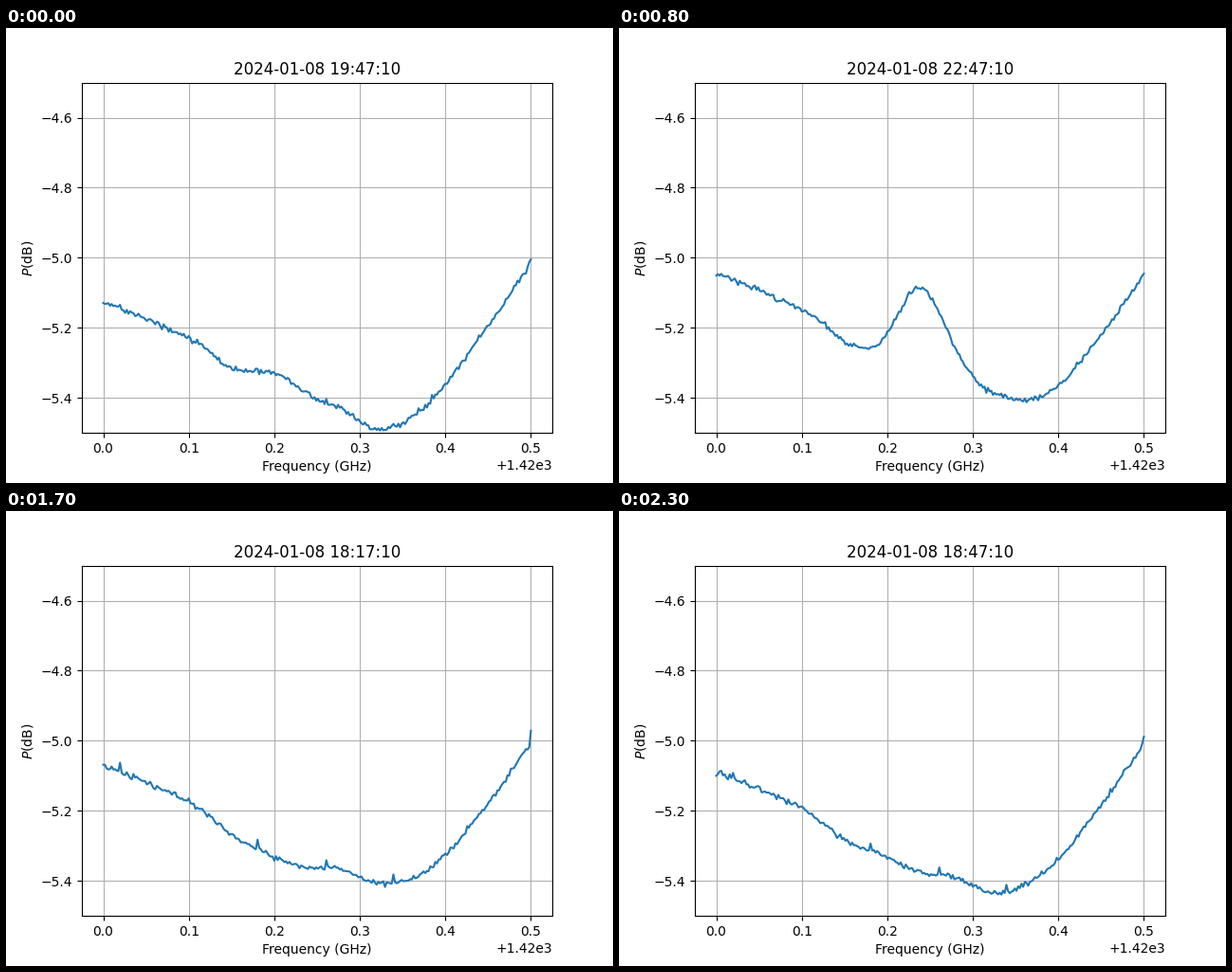
Recreate the animation shown at these times as a matplotlib script. Size 640x480 px, loop 2400 ms.

```python
import matplotlib.pyplot as plt
import numpy as np
from matplotlib.animation import FuncAnimation

# Half-hour slots counted from 18:17:10, in shuffled playing order
ORDER = [3, 3, 7, 0, 5, 10, 2, 11, 9, 1, 4, 8,
         10, 6, 2, 8, 5, 0, 7, 11, 4, 9, 6, 1]
SPIKES = [0.02, 0.18, 0.26, 0.34, 0.5]

# Receiver response at the first slot: frequency offset and level in dB
BAND_F = [0, 0.06, 0.12, 0.15, 0.18, 0.24, 0.27, 0.33, 0.39, 0.45, 0.5]
BAND_P = [-5.074, -5.13, -5.206, -5.268, -5.308, -5.363,
          -5.362, -5.408, -5.348, -5.178, -5.003]


def smooth(x, xk, yk):
    """Cubic curve through a few key points."""
    xk, yk = np.array(xk), np.array(yk)
    m = np.gradient(yk, xk, edge_order=2)
    i = np.clip(np.searchsorted(xk, x, side="right") - 1, 0, len(xk) - 2)
    h = xk[i + 1] - xk[i]
    t = (x - xk[i]) / h
    return ((1 + 2 * t) * (1 - t) ** 2 * yk[i] + t * (1 - t) ** 2 * h * m[i]
            + t ** 2 * (3 - 2 * t) * yk[i + 1] + t ** 2 * (t - 1) * h * m[i + 1])


def bell(f, center, width):
    return np.exp(-0.5 * ((f - center) / width) ** 2)


def drift(slot, *values):
    return np.interp(slot, [0, 3, 6, 9, 10, 11], values)


def spectrum(f, slot):
    """Receiver band plus gain drift and the growing hydrogen line."""
    low = drift(slot, 0, -0.055, -0.035, 0.027, 0.143, 0.16)
    high = drift(slot, 0, -0.01, 0.01, -0.043, -0.028, -0.025)
    edge = drift(slot, 0.4, 0.4, 0.4, 0.335, 0.355, 0.375)
    shoulder = drift(slot, 0, -0.03, 0, 0.02, 0.03, 0.05)
    peak = drift(slot, 0, 0.058, 0.122, 0.248, 0.275, 0.27)

    t = slot / 11
    center = 0.2 + 0.042 * t * t * (3 - 2 * t)
    width = 0.025 + 0.007 * np.sin(np.pi * t) ** 2

    p = smooth(f, BAND_F, BAND_P)
    p += low + (high - low) / (1 + np.exp((edge - f) / 0.025))
    p += shoulder * bell(f, 0.32, 0.035) + peak * bell(f, center, width)

    # Narrow interference fades through the evening
    for s in SPIKES:
        p[np.argmin(abs(f - s))] += 0.028 * np.exp(-slot / 2.5)
    noise = np.random.default_rng(1420 + slot)
    return p + noise.normal(0, 0.004, f.size)


freq = np.linspace(0, 0.5, 256)

fig, ax = plt.subplots(figsize=(6.4, 4.8), dpi=100)
line, = ax.plot(1420 + freq, spectrum(freq, ORDER[0]))
title = ax.set_title("")
ax.set_xlabel("Frequency (GHz)")
ax.set_ylabel("$P$(dB)")
ax.set_ylim(-5.5, -4.5)
ax.grid()


def update(i):
    slot = ORDER[i]
    hour, minute = divmod(18 * 60 + 17 + 30 * slot, 60)
    line.set_ydata(spectrum(freq, slot))
    title.set_text(f"2024-01-08 {hour}:{minute}:10")
    return line, title


ani = FuncAnimation(fig, update, frames=len(ORDER), interval=100,
                    repeat=True, repeat_delay=0)
plt.show()
```
